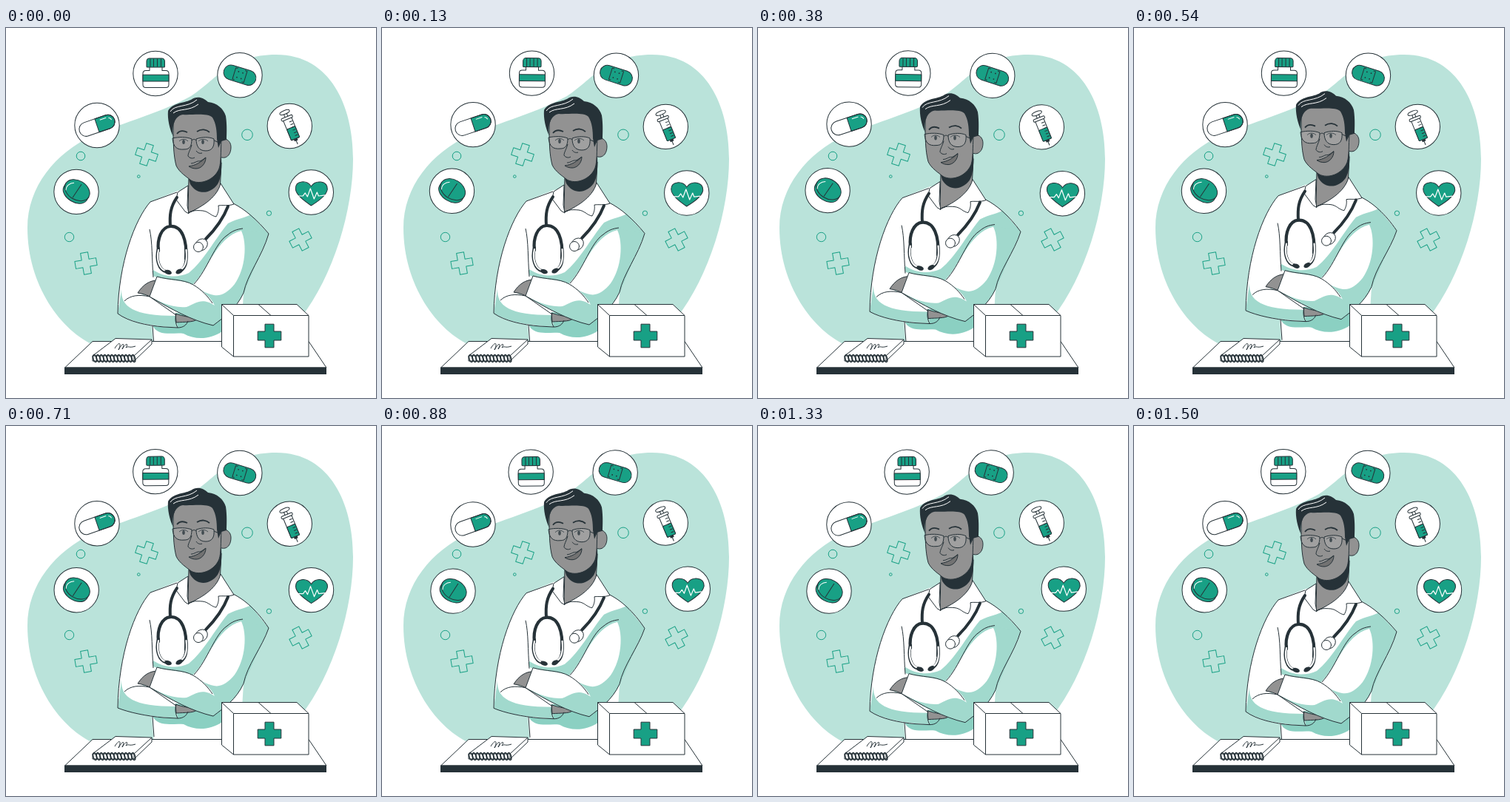
Write an HTML page with a canvas that moves like this. It is 500 by 500 pixels and loops after 1540 ms.

```html
<!DOCTYPE html>
<html lang="en">
<head>
<meta charset="utf-8">
<title>Doctor</title>
<style>
html, body { margin: 0; width: 100%; height: 100%; overflow: hidden; background: #fff; }
canvas { display: block; width: 100vw; height: 100vh; }
</style>
</head>
<body>
<canvas id="stage"></canvas>
<script>
const canvas = document.getElementById('stage');
const ctx = canvas.getContext('2d');
const LOOP = 1540, TAU = Math.PI * 2;
const DARK = '#263238', TEAL = '#18a085', PALE = '#bae3da', SHADE = '#a1d9cd', DEEP = '#8bd0c2';
const SKIN = '#929292', LIPS = '#727272', WHITE = '#fff';

function paint(path, fill, stroke, width = 1) {
  if (fill) { ctx.fillStyle = fill; ctx.fill(path); }
  if (stroke) { ctx.strokeStyle = stroke; ctx.lineWidth = width; ctx.stroke(path); }
}
const shape = (d, fill, stroke, width) => paint(new Path2D(d), fill, stroke, width);
const line = (d, color = DARK, width = 1) => shape(d, null, color, width);

function ellipse(x, y, rx, ry, turn, fill, stroke, width) {
  const path = new Path2D();
  path.ellipse(x, y, rx, ry, turn, 0, TAU);
  paint(path, fill, stroke, width);
}
const disc = (x, y, r, fill, stroke, width) => ellipse(x, y, r, r, 0, fill, stroke, width);

function box(x, y, w, h, r, fill, stroke, width) {
  const path = new Path2D();
  path.roundRect(x, y, w, h, r);
  paint(path, fill, stroke, width);
}

function at(x, y, turn, draw) {
  ctx.save();
  ctx.translate(x, y);
  ctx.rotate(turn);
  draw();
  ctx.restore();
}

function cross(x, y, turn, arm, half, fill, stroke) {
  const out = arm - half;
  at(x, y, turn, () => shape(
    `M${-half} ${-arm}h${2 * half}v${out}h${out}v${2 * half}h${-out}v${out}h${-2 * half}v${-out}h${-out}v${-2 * half}h${out}z`,
    fill, stroke));
}

function backdrop() {
  shape('M29 270C29 215 66 169 118 145C158 128 213 113 250 92C283 71 302 36 365 36C439 36 469 106 469 177C469 245 443 335 398 392L370 430H122C74 410 29 347 29 270Z', PALE);
  cross(190, 171, 0.32, 14.5, 5, null, TEAL);
  cross(108, 318, -0.17, 14.5, 5, null, TEAL);
  cross(398, 286, -0.48, 14.5, 5, null, TEAL);
  for (const [x, y, r] of [[101, 173, 5.8], [179.3, 200.6, 1.8], [85.5, 282.5, 6.2], [326, 144.3, 7.3], [355.4, 250.3, 3.2]])
    disc(x, y, r, null, TEAL);
}

function pill() {
  at(0, 0, 0.55, () => {
    shape('M-18 -3V3C-16 18 16 18 18 3V-3Z', TEAL, DARK);
    ellipse(0, -2.5, 18, 13, 0, TEAL, DARK);
  });
  line('M-5 8L7 -10');
  line('M-14 -2C-14 -8 -9 -12 -3 -12', WHITE);
}

function capsule() {
  at(0, 0.3, -0.33, () => {
    box(-25, -9.5, 50, 19, 9.5, WHITE);
    box(0, -9.5, 25, 19, [0, 9.5, 9.5, 0], TEAL, DARK);
    box(-25, -9.5, 50, 19, 9.5, null, DARK);
    line('M6 -6H15M18 -5C20 -4 21 -3 21 -1', WHITE);
  });
}

function bottle() {
  shape('M-8 -9H9V-4H14Q18 -4 18 0V15Q18 19 14 19H-13Q-17 19 -17 15V0Q-17 -4 -13 -4H-8Z', WHITE, DARK);
  box(-17, 1.8, 35, 8.7, 0, TEAL, DARK);
  box(-12, -20.5, 24.5, 12, [4, 4, 1, 1], TEAL, DARK);
  line('M-7 -20V-9M-2.5 -20V-9M2.5 -20V-9M7.5 -20V-9');
}

function bandage() {
  at(0, 0, 0.3, () => {
    box(-22.5, -10, 45, 20, 10, TEAL, DARK);
    line('M-5 -8H-8V8H-5M5 -8H8V8H5');
    for (const [x, y] of [[-3, -4], [3, -4], [-3, 4], [3, 4]]) disc(x, y, 0.9, DARK);
  });
}

function syringe() {
  at(1, 0.5, -0.39, () => {
    line('M0 16V26');
    line('M-2 -19V-11M2 -19V-11');
    ellipse(0, -20.5, 7, 2.5, 0, WHITE, DARK);
    box(-6, -12, 12, 30, 1, WHITE, DARK);
    box(-6, 2, 12, 16, 1, TEAL, DARK);
    box(-8, -14, 16, 3.5, 1.5, WHITE, DARK);
    box(-2.5, 18, 5, 3, 0, DARK);
    line('M1 -6H5M1 -2H5M1 2H5M1 6H5M1 10H5M1 14H5');
  });
}

function heart() {
  shape('M0 18C-10 11 -21 3 -21 -5C-21 -16 -6 -17 0 -8C6 -17 22 -16 22 -4C21 4 10 12 0 18Z', TEAL, DARK);
  line('M-19 5H-11L-8 1L-5 6L-1 -5L4 9L8 0L10 5L19 4', WHITE, 1.2);
}

const badges = [
  [95, 221.3, pill], [123, 131.5, capsule], [202, 61.5, bottle],
  [316, 63.7, bandage], [383.3, 132.5, syringe], [412.3, 222, heart]
];

function ring(turn) {
  const x0 = 254, y0 = 137;
  at(x0, y0, turn, () => {
    for (const [x, y, icon] of badges) {
      disc(x - x0, y - y0, 30.2, WHITE, DARK);
      at(x - x0, y - y0, 0, icon);
    }
  });
}

function coat(elbow) {
  shape(`M232 220L195 235L170 300L196 390L200 440H316L321 358L355 ${elbow}C339 259 323 245 307 237L290 212Z`, WHITE);
  line('M231 222L195 235');
  shape(`M300 264C313 257 326 256 330 252L355 ${elbow}L322 357L240 350L199 335V327C214 337 232 338 247 331C267 315 281 287 300 264Z`, SHADE);
  shape('M198 402C206 418 226 411 240 413C256 422 276 421 292 410V392L230 385Z', DEEP);
  line('M198 402L200 430');
}

function leftArm(elbow) {
  const outer = `M195 235C174 259 152 318 151 ${elbow}C166 397 190 402 213 404L232 405`;
  shape(`${outer}L230 387L181 358L199 337C197 312 200 289 194 271Z`, WHITE);
  shape(`M156 353C155 377 172 389 230 389L232 405C204 403 172 400 151 ${elbow}Z`, SHADE);
  shape('M229 386C239 390 250 390 258 394C252 398 242 397 230 398Z', SKIN, DARK);
  line(`${outer}C240 405 244 401 246 396M230 387C228 393 229 399 232 405`);
  line('M194 272C198 289 197 312 199 337M160 369C168 361 180 360 194 363L230 388');
}

function rightArm(elbow) {
  shape('M178 358C185 347 194 341 205 341L197 364C190 361 185 359 178 358Z', SKIN, DARK);
  shape(`M204 336L253 347C276 332 285 293 319 272L355 ${elbow}C344 308 326 333 321 358C311 380 294 391 280 402C250 395 223 380 194 363Z`, SHADE);
  shape('M252 347C274 326 284 283 318 274C326 291 324 325 309 346C300 357 291 363 281 361C270 359 261 353 252 347Z', WHITE);
  shape('M204 336C221 342 240 340 253 347C266 355 277 364 282 375C265 364 258 371 244 377C224 379 207 369 194 363Z', WHITE);
  line(`M204 336C221 341 239 339 253 347C265 354 273 363 279 372M194 363C224 380 250 395 280 402C294 391 311 380 321 358C326 333 346 309 355 ${elbow}C339 259 323 245 307 237M194 363L204 336`);
  line('M254 346C273 326 282 291 299 280C306 274 312 272 320 271');
}

function collar() {
  shape('M247 200L246 250C260 245 277 235 289 222L291 182Z', SKIN, DARK);
  shape('M247 204L291 175C292 193 290 204 286 211C276 225 258 226 249 211Z', DARK);
  shape('M246 213L232 222L230 232L242 248L247 251L245 240Z', WHITE, DARK);
  shape('M290 210L308 238C300 241 293 239 287 240C288 247 286 251 284 255C277 254 274 248 266 247C255 246 251 247 246 250C260 244 285 231 290 210Z', WHITE, DARK);
}

function stethoscope() {
  ctx.lineCap = 'round';
  line('M231 229C222 242 221 253 222 268M300 241C293 259 283 272 270 285', DARK, 4);
  line('M206 301C204 285 210 269 222 268C238 267 245 287 243 312', DARK, 4.2);
  line('M206 298C202 313 207 327 216 329M243 298C245 313 243 324 236 328', DARK, 4.2);
  line('M206 300C203 313 207 325 215 328M243.5 300C245 313 243 322 237 326', WHITE, 2.2);
  ellipse(219, 330, 5, 3, 0.3, DARK);
  ellipse(234, 329, 5, 3, -0.5, DARK);
  ellipse(264, 293, 9, 7.5, -0.7, WHITE, DARK);
  disc(260, 296, 6.5, WHITE, DARK);
  ctx.lineCap = 'butt';
}

function head() {
  shape('M286 153C294 146 304 151 304 161C304 172 297 178 289 174Z', SKIN, DARK);
  shape('M226 130C226 153 226 171 230 186C234 195 244 201 250 206C263 213 282 205 288 190C291 181 290 167 291 152L284 108L232 112Z', SKIN, DARK);
  shape('M226 147C221 136 218 123 219 112C225 101 239 102 250 97C258 91 267 94 273 100C285 101 294 109 297 119C299 132 298 145 298 151L291 153L287 162L285 150C285 140 284 129 279 121C272 114 251 118 239 117C227 119 224 134 226 147Z', DARK);
  line('M222 113C228 103 245 108 258 97M226 115C235 108 247 113 260 103', WHITE);
  line('M231 143C235 138 241 139 245 141M258 140C264 136 271 137 275 141', DARK, 1.8);
  line('M234 153C238 149 243 150 246 153M260 153C264 149 270 150 273 153');
  ellipse(240, 154, 1.8, 3, 0, DARK);
  ellipse(266, 154, 1.8, 3, 0, DARK);
  line('M251 158C249 165 246 169 246 173C248 176 252 177 255 175M257 166C259 169 262 170 265 169');
  const lens = 'rgba(255,255,255,.13)';
  shape('M225 149C233 147 244 147 251 150C251 160 248 164 241 164C231 165 226 161 225 149Z', lens, DARK);
  shape('M257 150C265 147 275 147 281 150C282 161 278 166 270 166C261 166 257 160 257 150Z', lens, DARK);
  line('M251 152C253 150 255 150 257 152M281 152L288 155');
  shape('M247 187C256 186 264 181 270 175C270 184 263 190 257 190C253 190 250 189 247 187Z', LIPS, DARK);
  line('M250 183C255 183 258 179 262 180C265 179 267 177 270 175');
}

// The elbows rise only half as far as the chest and head.
function doctor(lift) {
  const lag = lift / 2;
  ctx.save();
  ctx.translate(0, -lift);
  coat(278 + lag);
  leftArm(386 + lag);
  collar();
  stethoscope();
  rightArm(278 + lag);
  head();
  ctx.restore();
}

function notebook() {
  shape('M117 443L148 419.5L197 421V427L173 450H117Z', WHITE, DARK);
  line('M117 443H173L197 421M173 443V450');
  line('M147 433C152 424 157 424 152 435C158 424 161 426 157 434C164 423 165 428 162 432C167 429 165 433 175 430');
  for (let x = 120; x < 174; x += 4.75) ellipse(x, 446.5, 2.2, 5, -0.25, null, DARK, 1.6);
}

function desk() {
  shape('M117 423.5H409L433 459H79.5Z', WHITE, DARK);
  box(79, 458.5, 354, 9.5, 0, DARK);
  notebook();
  shape('M291.5 373.5H393L409 388.5V444H307.5L291.5 431Z', WHITE, DARK);
  line('M291.5 373.5L307.5 388.5H409M307.5 388.5V444M341 373.5L358 388.5');
  cross(356, 416, 0, 15.8, 6, TEAL, DARK);
}

function resize() {
  const scale = window.devicePixelRatio || 1;
  canvas.width = innerWidth * scale;
  canvas.height = innerHeight * scale;
}

function frame(now) {
  const phase = (now % LOOP) / LOOP * TAU;
  ctx.setTransform(canvas.width / 500, 0, 0, canvas.height / 500, 0, 0);
  ctx.fillStyle = WHITE;
  ctx.fillRect(0, 0, 500, 500);
  ctx.lineJoin = 'round';
  backdrop();
  ring(0.014 * Math.sin(phase + 0.2) - 0.003);
  doctor(5 - 5 * Math.cos(phase + 0.1));
  desk();
  requestAnimationFrame(frame);
}

addEventListener('resize', resize);
resize();
requestAnimationFrame(frame);
</script>
</body>
</html>
```
